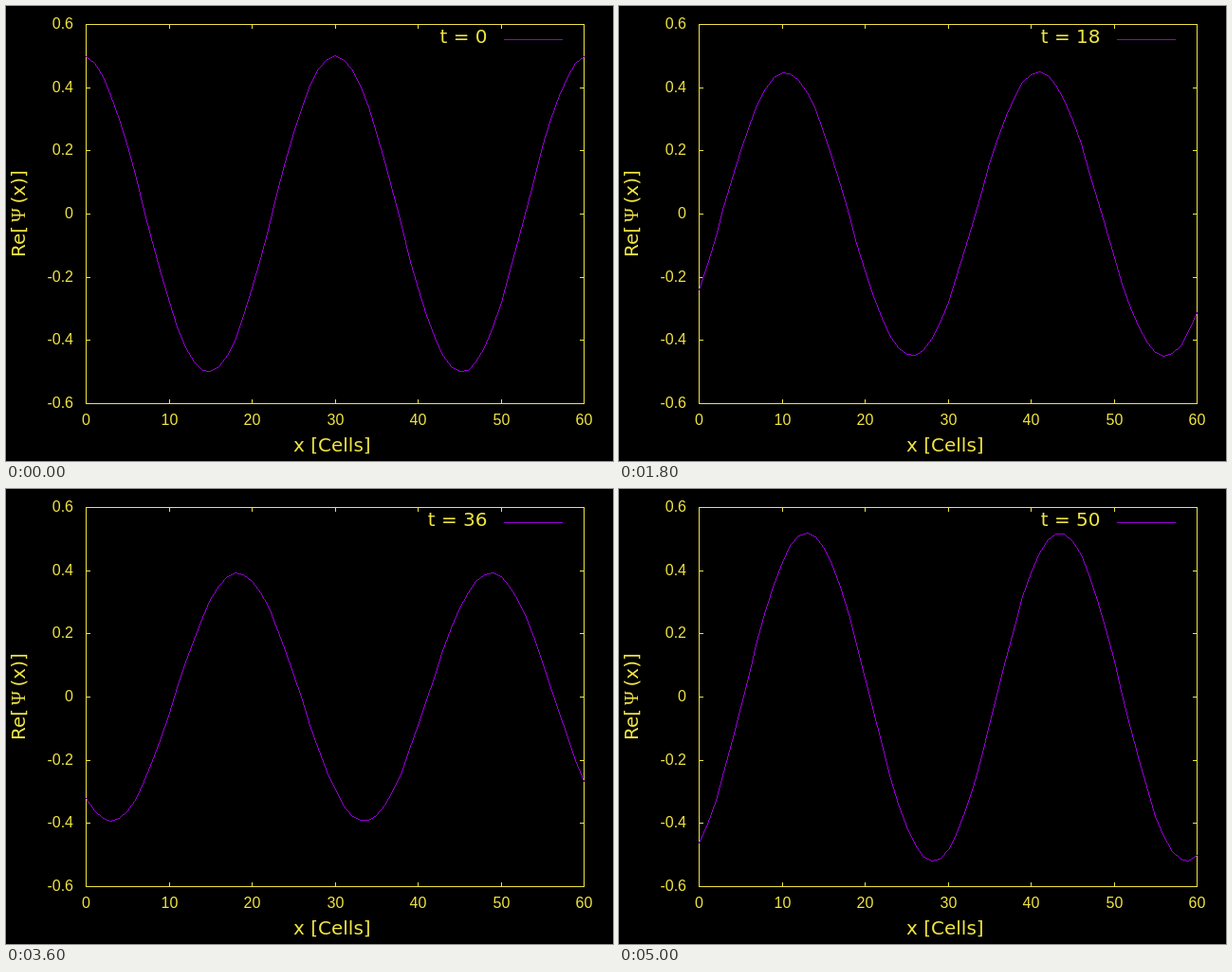
These frames come from a looping animation (640 px wide and 480 px high, 5100 ms). An HTML page with a canvas:

```html
<!DOCTYPE html>
<html lang="en">
<head>
<meta charset="utf-8">
<title>Travelling wave</title>
<style>
  html, body { margin: 0; width: 100%; height: 100%; overflow: hidden; background: #000; }
  canvas { display: block; }
</style>
</head>
<body>
<canvas id="stage" width="640" height="480"></canvas>
<script>
const ctx = document.getElementById('stage').getContext('2d');
const YELLOW = '#f0e442', PURPLE = '#9400d3';
const LEFT = 84, RIGHT = 609, TOP = 19, BOTTOM = 419;
const TICK_FONT = '16px "Liberation Sans", Arial, sans-serif';
const TITLE_FONT = '20px "DejaVu Sans", sans-serif';
const PSI_FONT = '20px "Liberation Serif", serif';
const STEP_MS = 100, STEPS = 51;
const RAD = Math.PI / 180;

const mapX = x => Math.round(LEFT + x * (RIGHT - LEFT) / 60);
const mapY = y => Math.round((TOP + BOTTOM) / 2 - y * (BOTTOM - TOP) / 1.2);

function text(str, x, y, font, align) {
  ctx.font = font;
  ctx.textAlign = align;
  ctx.fillText(str, x, y);
}

// One-pixel line without antialiasing
function pixelLine(x0, y0, x1, y1) {
  const n = Math.max(Math.abs(x1 - x0), Math.abs(y1 - y0), 1);
  for (let i = 0; i <= n; i++) {
    ctx.fillRect(Math.round(x0 + (x1 - x0) * i / n), Math.round(y0 + (y1 - y0) * i / n), 1, 1);
  }
}

// Right- and left-moving waves: the complex amplitude runs round an ellipse
function wave(x, t) {
  const turn = (23.3 + 46.2 * t) * RAD;
  const phase = 2 * Math.PI * (x - 30) / 30.5 + 16.7 * RAD;
  return 0.5213 * Math.cos(turn) * Math.cos(phase) + 0.363 * Math.sin(turn) * Math.sin(phase);
}

function drawCurve(t) {
  ctx.fillStyle = PURPLE;
  for (let x = 0; x < 60; x++) {
    pixelLine(mapX(x), mapY(wave(x, t)), mapX(x + 1), mapY(wave(x + 1, t)));
  }
}

function drawAxes() {
  ctx.fillStyle = YELLOW;
  pixelLine(LEFT, TOP, RIGHT, TOP);
  pixelLine(LEFT, BOTTOM, RIGHT, BOTTOM);
  pixelLine(LEFT, TOP, LEFT, BOTTOM);
  pixelLine(RIGHT, TOP, RIGHT, BOTTOM);
  for (let i = 0; i <= 6; i++) {
    const x = mapX(i * 10), value = (i - 3) / 5, y = mapY(value);
    ctx.fillRect(x, TOP, 1, 5);
    ctx.fillRect(x, BOTTOM - 4, 1, 5);
    ctx.fillRect(LEFT, y, 5, 1);
    ctx.fillRect(RIGHT - 4, y, 5, 1);
    text(String(i * 10), x + 0.5, 442, TICK_FONT, 'center');
    text(String(value), 71, y + 5, TICK_FONT, 'right');
  }
  text('x [Cells]', 303, 470, TITLE_FONT, 'left');

  ctx.save();
  ctx.translate(20, 265);
  ctx.rotate(-Math.PI / 2);
  text('Re[', 0, 0, TITLE_FONT, 'left');
  text('Ψ', 44.5, 0, PSI_FONT, 'center');
  text('(x)]', 56.5, 0, TITLE_FONT, 'left');
  ctx.restore();
}

function draw(t) {
  ctx.fillStyle = '#000';
  ctx.fillRect(0, 0, 640, 480);
  drawAxes();
  text('t = ' + t, 507.5, 39, TITLE_FONT, 'right');
  drawCurve(t);
  pixelLine(525, 35, 586, 35);
}

const start = performance.now();
let shown = -1;

function tick() {
  const t = Math.floor((performance.now() - start) / STEP_MS) % STEPS;
  if (t !== shown) draw(shown = t);
  requestAnimationFrame(tick);
}
tick();
</script>
</body>
</html>
```
